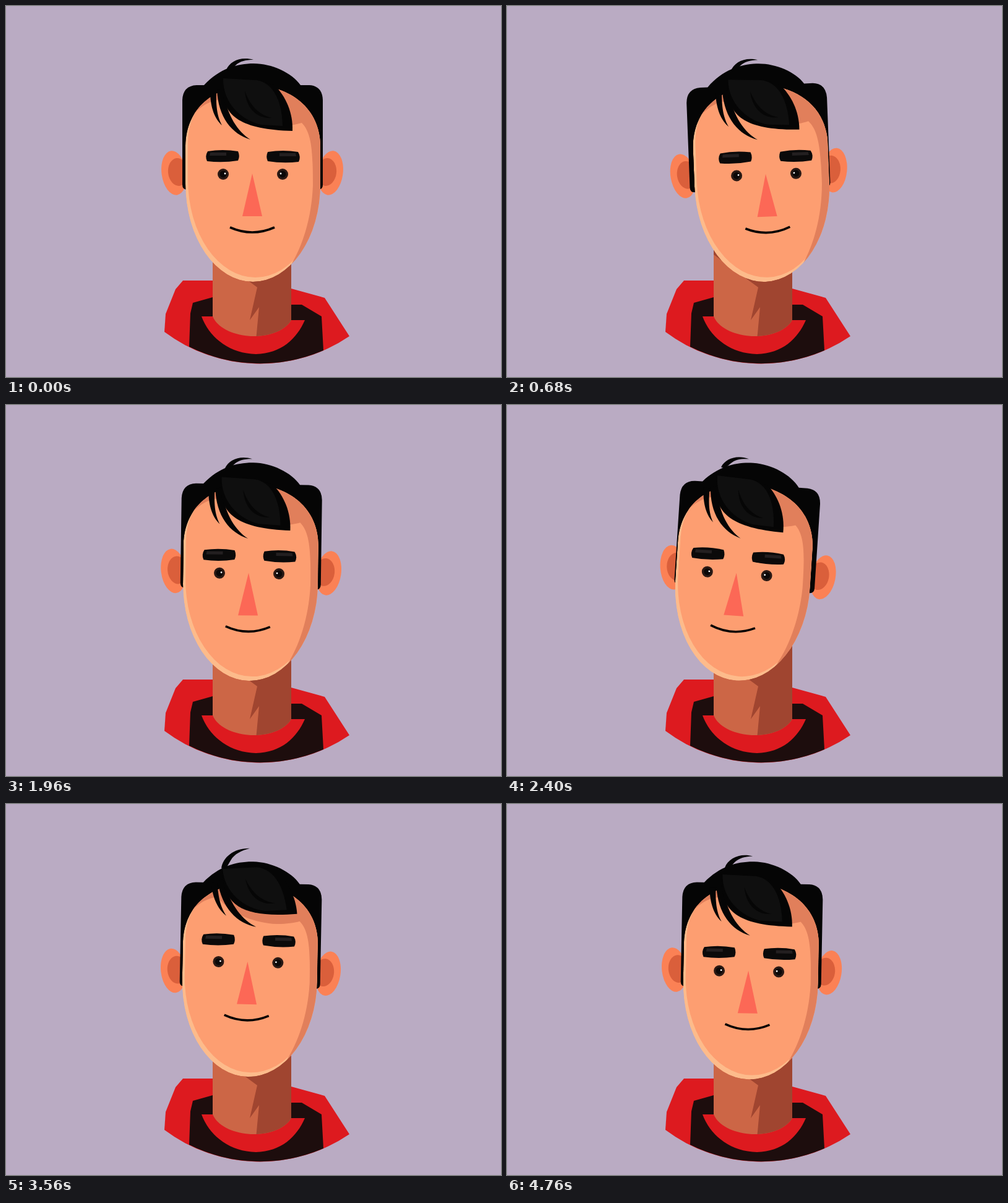
An HTML page that plays this animation: 800 by 600 pixels, repeating every 5.16 s.

```html
<!DOCTYPE html>
<html lang="en">
<head>
<meta charset="utf-8">
<title>Turning head</title>
<style>
  html, body { margin: 0; width: 100%; height: 100%; overflow: hidden; background: #baabc3; }
  svg { display: block; width: 100vw; height: 100vh; }
</style>
</head>
<body>
<svg viewBox="0 0 800 600">
  <defs>
    <path id="faceShape" d="M398 127C460 130 507 165 508 226V288A109 158 0 0 1 290 288V226C291 165 336 130 398 127Z"/>
    <clipPath id="faceClip"><use href="#faceShape"/></clipPath>
    <path id="neckShape" d="M334 370V502C342 522 372 534 400 534C428 534 452 524 461 508V370Z"/>
    <clipPath id="neckClip"><use href="#neckShape"/></clipPath>
    <g id="earShape">
      <ellipse cx="271.5" cy="270" rx="20" ry="36" fill="#fb8155" transform="rotate(-8 271.5 270)"/>
      <ellipse cx="278" cy="268.5" rx="16" ry="22.5" fill="#da5f3b" transform="rotate(-6 278 268.5)"/>
    </g>
    <g id="browShape">
      <path d="M326 235Q350 231 375 235Q378.5 243 375 250Q350 254 325 251Q321 243 326 235Z" fill="#0b0a0a"/>
      <path d="M330 237H356V242H329Z" fill="#231f20"/>
    </g>
    <g id="eyeShape">
      <circle cx="351" cy="272" r="9" fill="#2a1914"/>
      <circle cx="351" cy="272" r="5.5" fill="#0b0808"/>
      <circle cx="354" cy="271" r="1.4" fill="#fff"/>
    </g>
  </defs>

  <rect width="800" height="600" fill="#baabc3"/>

  <!-- shoulders, shirt and neck -->
  <path d="M286 444H334L461 457L515 472L555 534A257 257 0 0 1 256 527L258 498L274 458Z" fill="#dd1a1f"/>
  <path d="M334 471L302 480L298 497L296 551A257 257 0 0 0 513 557L510 502L478 483H461Z" fill="#1d0d0d"/>
  <path d="M316 502H334L461 508H483C470 538 445 562 404 563C360 562 328 535 316 502Z" fill="#dd1a1f"/>
  <use href="#neckShape" fill="#cc6646"/>
  <path d="M334 402L406 455L394 508L409 487L404 540H470V360H334Z" fill="#a04530" clip-path="url(#neckClip)"/>

  <g id="head">
    <g id="leftEar"><use href="#earShape"/></g>
    <g id="rightEar"><use href="#earShape" transform="matrix(-1 0 0 1 796 0)"/></g>
    <path d="M285 289V152Q286 129 308 128H320C345 101 374 93 400 93C430 93 462 108 476 128H490Q511 129 512 152V289Q512 297 504 297H293Q285 297 285 289Z" fill="#050505"/>

    <g id="face">
      <g clip-path="url(#faceClip)">
        <use href="#faceShape" fill="#fdbb8b"/>
        <use href="#faceShape" fill="#fd9e71" transform="translate(4 -7)"/>
        <path d="M296 185C308 165 330 152 345 152C365 180 410 194 440 194C455 194 468 192 478 189C494 205 496 235 496 290C494 345 478 390 461 418L520 440V100H296Z" fill="#e17f5b"/>
      </g>
    </g>

    <g id="features">
      <use href="#eyeShape"/>
      <use href="#eyeShape" transform="matrix(-1 0 0 1 798 0)"/>
      <path d="M398 271L382 340H414Z" fill="#fc6856"/>
      <path d="M362 358Q398 374 434 358" fill="none" stroke="#050303" stroke-width="3.6"/>
      <g id="brows">
        <use href="#browShape"/>
        <use href="#browShape" transform="matrix(-1 0 0 1 798 1)"/>
      </g>
    </g>

    <g id="fringe">
      <path d="M330 138C330 165 338 183 349 193C342 180 339 165 340 138Z" fill="#050505"/>
      <path d="M341 136C343 180 365 207 395 216C375 203 358 180 350 134Z" fill="#050505"/>
      <path d="M350 118V137C352 178 380 200 463 202C464 172 452 146 434 128L405 119Z" fill="#050505"/>
      <path d="M351 117L405 120C430 124 446 150 447 194L412 192C378 184 350 155 351 117Z" fill="#0f0f0f"/>
      <path d="M386 137C388 165 405 183 430 181C408 176 394 160 386 137Z" fill="#060606"/>
    </g>
    <path id="curl" d="M356 103C362 89 380 81 400 87C388 87 378 89 371 96L362 105Z" fill="#050505"/>
  </g>
</svg>

<script>
const LOOP = 5160, STEP = 40, LAST_CHANGE = 4760;

// Each track is a list of [time in ms, value].
const turnTrack = [[0, 0], [1250, -3.9], [2500, 3.9], [3400, 1.1]];
const nodTrack = [[3000, 0], [3750, 1], [4140, 0.16], [4760, 0.1]];
const liftTrack = [[3125, 0], [3800, 1], [4120, 0.23], [4760, 0.14]];

function sample(track, time) {
  if (time <= track[0][0]) return track[0][1];
  for (let i = 1; i < track.length; i++) {
    const [start, from] = track[i - 1], [end, to] = track[i];
    if (time < end) {
      const eased = (1 - Math.cos(Math.PI * (time - start) / (end - start))) / 2;
      return from + (to - from) * eased;
    }
  }
  return track[track.length - 1][1];
}

function place(id, transform) {
  document.getElementById(id).setAttribute('transform', transform);
}

function draw(time) {
  const turn = sample(turnTrack, time);
  const nod = sample(nodTrack, time);
  const lift = sample(liftTrack, time);
  const right = Math.max(0, -turn), left = Math.max(0, turn);
  const dip = right + left;
  const featureShift = 4.6 * right - 3.6 * left;
  const faceShift = 0.25 * featureShift;
  const hairShift = 1.1 * right - 2 * left;

  place('head', `translate(${0.8 * right} ${0.2 * dip}) rotate(${turn} 398 65)`);
  place('leftEar', `translate(${1.4 * right + 2.5 * left} ${2 * nod})`);
  place('rightEar', `translate(${-2.1 * right} ${2 * nod})`);
  place('face', `translate(${faceShift} 130) scale(1 ${1 - 0.0185 * nod}) translate(0 -130)`);
  place('features', `translate(${featureShift} ${0.35 * dip - 19.5 * nod})`);
  place('brows', `translate(0 ${-8 * nod})`);
  place('fringe', `translate(${hairShift} 0) rotate(${-10 * lift} 262 95)`);
  place('curl', `translate(${hairShift + 356 - 7 * lift} ${103 + 2 * lift})
    rotate(${-22 * lift}) scale(${1 + 0.27 * lift}) translate(-356 -103)`);
}

function tick() {
  const time = performance.now() % LOOP;
  draw(Math.min(Math.floor(time / STEP) * STEP, LAST_CHANGE));
  requestAnimationFrame(tick);
}
tick();
</script>
</body>
</html>
```
